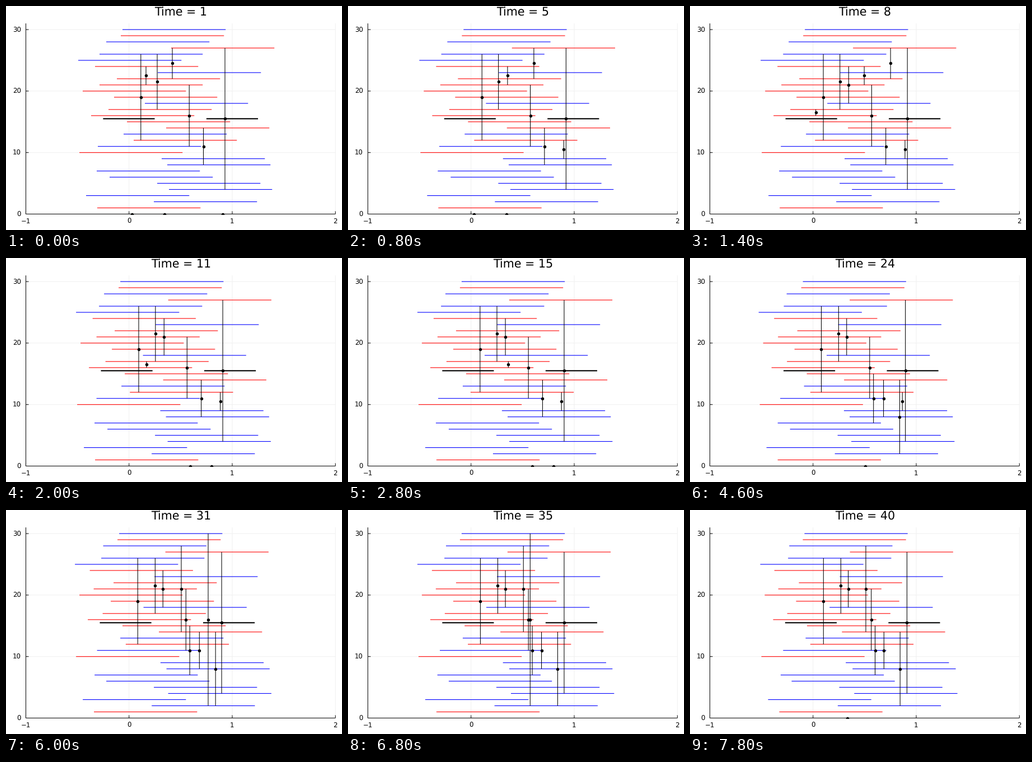
A matplotlib script for the animation above (8000 ms loop, 600x400 px).

```python
import numpy as np
import matplotlib.pyplot as plt
from matplotlib.animation import FuncAnimation
from matplotlib.collections import LineCollection
from matplotlib.patches import Rectangle

plt.rcParams["text.hinting"] = "none"

W, H, DPI = 600, 400, 100
STEPS, INTERVAL = 40, 200
X0, UNIT = 219.7, 184.24      # pixel of x = 0, pixels per x unit
Y0, ROW = 371.5, 10.98        # pixel of y = 0, pixels per row
PT = 72 / DPI
PULL = .15                    # drift a motor gives an opposed pair, per step
WALK = UNIT / 20              # stride of a motor on a matching pair

# Filaments from row 1 up: polarity and left end at the start
POLARITY = "rbbbbbbbbrbrbrrrrbrrrrbrbbrbrb"
STARTS = [163, 264, 143, 291, 270, 185, 162, 288, 278, 131,
          164, 228, 210, 286, 216, 152, 183, 248, 193, 137,
          167, 198, 271, 159, 129, 167, 295, 179, 205, 208]
ANCHORS = np.array([173.4, 357.9])

# Motors: start x, then {time: rows it binds}, empty when unbound
MOTORS = [
    (391, {1: (27, 4)}),
    (240.8, {1: (26, 12)}),
    (270, {1: (26, 17)}),
    (327.2, {1: (21, 11)}),
    (352.5, {1: (14, 8)}),
    (250, {1: (24, 21), 10: (), 17: (15, 7)}),
    (297, {1: (27, 22), 9: (), 16: (15, 14), 17: (14, 2)}),
    (283.3, {1: (), 8: (24, 18)}),
    (224.6, {1: (), 8: (17, 16), 18: (), 28: (28, 14)}),
    (386.8, {1: (), 2: (12, 9), 27: (), 29: (30, 2), 40: ()}),
]

sign = np.array([1 if p == "b" else -1 for p in POLARITY])
rows = np.arange(1, len(sign) + 1)


def sway(i):
    return -6.4 * np.sin(np.pi * i / 48)


def bound_rows(plan, time):
    return plan[max(t for t in plan if t <= time)]


def simulate():
    """Left ends, motor positions and bindings for every step."""
    left = np.array(STARTS, float)
    motors = np.array([m[0] for m in MOTORS], float)
    history = []
    for i in range(STEPS):
        binds = [bound_rows(plan, i + 1) for _, plan in MOTORS]
        history.append((left.copy(), motors.copy(), binds))
        speed = np.full(len(left), sway(i + 1) - sway(i))
        pairs = [np.array(b, int) - 1 for b in binds]
        for pair in pairs:
            if len(pair) and sign[pair].sum() == 0:
                speed[pair] += PULL * sign[pair]
        for k, pair in enumerate(pairs):
            if len(pair):
                motors[k] += speed[pair].mean() - WALK * sign[pair].mean()
        left += speed
    return history


def row_y(row):
    return Y0 - ROW * row


def bars(xs, ys, length):
    return [[(x, y), (x + length, y)] for x, y in zip(xs, ys)]


fig = plt.figure(figsize=(W / DPI, H / DPI), dpi=DPI, facecolor="white")
ax = fig.add_axes([0, 0, 1, 1])
ax.set_xlim(0, W)
ax.set_ylim(H, 0)
ax.axis("off")

LEFT, RIGHT, TOP, BOTTOM = X0 - UNIT, X0 + 2 * UNIT, row_y(31), Y0


def rule(xs, ys, color="black", z=1):
    ax.plot(xs, ys, color=color, lw=PT, zorder=z, solid_capstyle="butt",
            snap=False)


def label(x, y, text, size, ha="center"):
    return ax.text(x, y, text, family="DejaVu Sans", color="black",
                   size=size * PT, ha=ha, va="baseline")


for v in (-1, 0, 1, 2):
    x = X0 + v * UNIT
    if v >= 0:
        rule([x, x], [TOP, BOTTOM], "#f0f0f0", 0)
    rule([x, x], [BOTTOM, BOTTOM - 5])
    label(x, 387.5, str(v).replace("-", "\u2212"), 11.8)
for v in (0, 10, 20, 30):
    y = row_y(v)
    if v:
        rule([LEFT, RIGHT], [y, y], "#f0f0f0", 0)
    rule([LEFT, LEFT + 5], [y, y])
    label(27, y + 4.4, str(v), 11.8, "right")
rule([LEFT, LEFT], [TOP, BOTTOM])
rule([LEFT, RIGHT], [BOTTOM, BOTTOM])


def strokes(color, width, z):
    group = LineCollection([], colors=color, linewidths=width * PT, zorder=z)
    group.set_snap(False)
    return ax.add_collection(group, autolim=False)


filaments = strokes(["blue" if s > 0 else "red" for s in sign], 1.1, 2)
anchors = strokes("black", 2.1, 3)
links = strokes("black", 1.05, 4)
dots, = ax.plot([], [], "o", color="black", ms=5.5 * PT, mew=0, zorder=5,
                snap=False)
dots.set_clip_path(Rectangle((LEFT, TOP), RIGHT - LEFT, BOTTOM - TOP,
                             transform=ax.transData))
title = label(312.4, 18.2, "", 20.7)
history = simulate()


def draw(i):
    left, motors, binds = history[i]
    filaments.set_segments(bars(left, row_y(rows), UNIT))
    anchors.set_segments(bars(ANCHORS + sway(i), [row_y(15.5)] * 2, UNIT / 2))
    links.set_segments([[(x, row_y(b[0])), (x, row_y(b[1]))]
                        for x, b in zip(motors, binds) if b])
    dots.set_data(motors, [row_y(sum(b) / 2) for b in binds])
    title.set_text(f"Time = {i + 1}")
    return filaments, anchors, links, dots, title


anim = FuncAnimation(fig, draw, frames=STEPS, interval=INTERVAL, repeat=True,
                     repeat_delay=0, init_func=lambda: draw(0))
plt.show()
```
